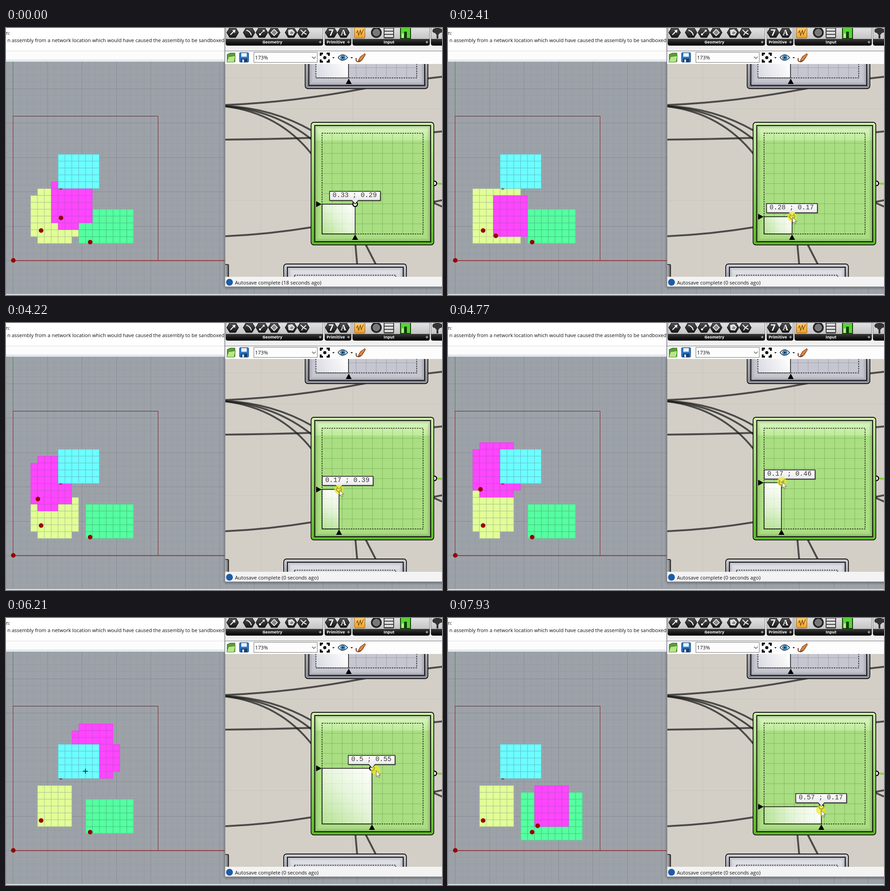
Recreate the animation shown at these times as an HTML page with a canvas. Size 956 by 586 pixels, loop 8 s.

```html
<!DOCTYPE html>
<html lang="en">
<head>
<meta charset="utf-8">
<title>Room packing</title>
<style>
html, body { margin: 0; width: 100%; height: 100%; overflow: hidden; background: #fff; }
canvas { display: block; width: 956px; height: 586px; }
</style>
</head>
<body>
<canvas id="stage" width="956" height="586"></canvas>
<script>
const W = 956, H = 586, LOOP = 8000, START = 260, STEP = 69;
const CELL = 15.07, GX = 53.9, GY = 231.9;
const UI = '11.2px "Open Sans", sans-serif';
const stage = document.getElementById('stage').getContext('2d');
const backdrop = document.createElement('canvas');
backdrop.width = W;
backdrop.height = H;
let g = backdrop.getContext('2d');

// time, slider x, slider y
const PATH = [
  [0, .33, .294], [1300, .33, .294], [1930, .33, .27], [2399, .28, .17],
  [2469, .28, .17], [2800, .21, .18], [3180, .19, .38], [3620, .2, .18],
  [4193, .17, .39], [4263, .17, .39], [4420, .155, .41], [5180, .2, .52],
  [5297, .24, .55], [5367, .262, .55], [5700, .3, .6], [6050, .385, .6],
  [6194, .497, .55], [6264, .535, .53], [6830, .57, .335], [6884, .57, .313],
  [6954, .575, .267], [7300, .595, .24], [7660, .6, .215], [7919, .57, .17],
  [7989, .565, .138]
];
const POINTER = [[330, 555, 545], [1020, 761, 420], [1290, 766, 387]];

// helpers
function at(table, t) {
  let i = 1;
  while (i < table.length - 1 && table[i][0] < t) i++;
  const p = table[i - 1], q = table[i];
  const u = Math.min(1, Math.max(0, (t - p[0]) / (q[0] - p[0])));
  return [p[1] + (q[1] - p[1]) * u, p[2] + (q[2] - p[2]) * u];
}
function box(x, y, w, h, fill) {
  g.fillStyle = fill;
  g.fillRect(x, y, w, h);
}
function outline(x, y, w, h, color, lw) {
  g.strokeStyle = color;
  g.lineWidth = lw;
  g.strokeRect(x, y, w, h);
}
function round(x, y, w, h, r, fill, stroke, lw = 1) {
  g.beginPath();
  g.roundRect(x, y, w, h, r);
  paint(fill, stroke, lw);
}
function paint(fill, stroke, lw = 1) {
  if (fill) { g.fillStyle = fill; g.fill(); }
  if (stroke) { g.strokeStyle = stroke; g.lineWidth = lw; g.stroke(); }
}
function disc(x, y, r, fill, stroke, lw) {
  g.beginPath();
  g.arc(x, y, r, 0, Math.PI * 2);
  paint(fill, stroke, lw);
}
function poly(points, fill, stroke, lw) {
  g.beginPath();
  points.forEach(([x, y]) => g.lineTo(x, y));
  g.closePath();
  paint(fill, stroke, lw);
}
function line(x1, y1, x2, y2, color, lw = 1) {
  g.beginPath();
  g.moveTo(x1, y1);
  g.lineTo(x2, y2);
  paint(null, color, lw);
}
function curve(d, color, lw) {
  g.strokeStyle = color;
  g.lineWidth = lw;
  g.stroke(new Path2D(d));
}
function text(s, x, y, font, color, align = 'left') {
  g.font = font;
  g.fillStyle = color;
  g.textAlign = align;
  g.fillText(s, x, y);
}
function fade(x1, y1, x2, y2, ...colors) {
  const f = g.createLinearGradient(x1, y1, x2, y2);
  colors.forEach((c, i) => f.addColorStop(i / (colors.length - 1), c));
  return f;
}
function dashed(x, y, w, h) {
  g.setLineDash([3, 2.2]);
  outline(x, y, w, h, '#111', 1.5);
  g.setLineDash([]);
}
function mesh(x, y, w, h, gap, color) {
  for (let i = gap; i < w - 1; i += gap) line(x + i, y, x + i, y + h, color);
  for (let i = gap; i < h - 1; i += gap) line(x, y + i, x + w, y + i, color);
}
const upMark = (x, y) => poly([[x, y], [x + 6.5, y + 12], [x - 6.5, y + 12]], '#000');

// fixed scenery
function drawViewport() {
  box(0, 0, W, H, '#fff');
  box(0, 50, 480, 1, '#dcdfe3');
  box(0, 51, 480, 18, '#fcfcfd');
  box(0, 69, 480, 5, '#e2e8ee');
  text('n:', -1, 15, UI, '#111');
  text('n assembly from a network location which would have caused the assembly to be sandboxed', 479, 31, '11px "Open Sans", sans-serif', '#111', 'right');
  box(0, 74, W, 510, '#9da2a9');
  for (let i = -1; i < 64; i++) {
    const x = Math.round(16 + i * 15.1) - .5;
    line(x, 74, x, 584, i % 5 ? '#969ca3' : '#878d95');
  }
  for (let i = -4; i < 29; i++) {
    const y = Math.round(510 - i * 15.1) + .5;
    line(0, y, 480, y, i % 5 ? '#969ca3' : '#878d95');
  }
  box(0, 584, W, 2, '#e2e8ee');
  line(15.5, 74, 15.5, 194, '#3f8a48');
  line(16, 510.5, 480, 510.5, '#931c20', 1.3);
  line(15.5, 193.5, 15.5, 510, '#931c20');
  line(333.5, 193.5, 333.5, 510, '#84262a');
  line(15.5, 193.5, 333.5, 193.5, '#54262b');
  disc(16, 510, 5, '#960000');
}

function hex(x) {
  const p = [];
  for (let i = 0; i < 6; i++) p.push([x + 13 * Math.cos(i * Math.PI / 3), 10 + 12.5 * Math.sin(i * Math.PI / 3)]);
  poly(p, fade(0, -2, 0, 22, '#555', '#111'), '#000', 1);
}
function group(x, w, label, cx) {
  round(x, -8, w, 46, 4, fade(0, 0, 0, 24, '#e2e2e2', '#c4c4c4'), '#777');
  round(x, 24, w, 14.5, [0, 0, 4, 4], fade(0, 24, 0, 38, '#3a3a3a', '#000'));
  text(label, cx, 34, 'bold 8.8px "Open Sans", sans-serif', '#fff', 'center');
  const px = x + w - 6;
  line(px - 3, 31, px + 3, 31, '#ccc', 1.3);
  line(px, 28, px, 34, '#ccc', 1.3);
}
function drawRibbon() {
  box(480, 0, 476, 51, '#f0f0f0');
  group(482, 213, 'Geometry', 584);
  group(699, 58, 'Primitive', 723);
  group(760, 169, 'Input', 840);
  group(932, 60, '', 960);
  [497, 533, 561, 588, 625, 652, 713, 740].forEach(hex);
  line(492, 15, 500, 7, '#fff', 2);
  poly([[503, 4], [502, 11], [496, 5]], '#fff');
  curve('M527 5Q536 7 538 16', '#fff', 2);
  line(557, 14, 565, 6, '#fff', 1.5);
  box(555, 12, 4, 4, '#fff');
  box(563, 4, 4, 4, '#fff');
  poly([[588, 3], [595, 10], [588, 17], [581, 10]], '#888', '#fff', 1.5);
  poly([[619, 5], [627, 3], [633, 9], [629, 16], [620, 15]], '#ddd', '#fff', 1);
  poly([[626, 7], [631, 10], [627, 14], [622, 12]], '#888');
  curve('M646 4L652 10L658 5M652 10L648 16M652 10L659 14', '#eee', 2.2);
  text('7', 713, 17, 'bold 19px "Open Sans", sans-serif', '#fff', 'center');
  text('A', 740, 16, 'bold 17px "Noto Serif", serif', '#fff', 'center');
  round(764, -3, 23, 25, 2, fade(0, 0, 0, 22, '#ffcf70', '#ee9d23'), '#8a5510');
  curve('M768 11L771 6L773 16L777 5L779 14L784 3', '#74470c', 1.3);
  disc(812, 10, 11, '#333', '#111', 1.5);
  disc(812, 10, 7, '#777', '#aaa', 1);
  round(828, -3, 23, 26, 3, '#444');
  [1, 8, 15].forEach(y => round(830, y, 19, 5, 1, '#ddd'));
  box(864, -2, 24, 26, '#173d0d');
  box(866, 0, 20, 22, '#55d633');
  box(873, 8, 6, 14, '#143a0a');
  box(868, 12, 4, 10, '#b4f68d');
  [[940, 6], [946, 2], [952, 6], [946, 10]].forEach(([x, y]) => disc(x, y, 5, '#333'));
  box(944, 10, 4, 13, '#333');
}
function drawToolbar() {
  box(480, 50, 476, 1, '#777');
  box(480, 51, 476, 28, '#fdfdfd');
  poly([[485, 58], [492, 55], [502, 55], [502, 74], [485, 74]], '#5d9c3c', '#2d5e1d', 1);
  poly([[488, 63], [503, 61], [500, 75], [484, 75]], '#b7e884', '#47842d', 1);
  round(512, 54, 20, 21, 2, '#2f78c4', '#123f76');
  box(516, 55, 12, 8, '#e9f2fb');
  box(515, 67, 14, 8, '#173f70');
  box(518, 69, 4, 6, '#ddd');
  outline(543.5, 53.5, 139, 22, '#777', 1);
  text('173%', 546, 69, UI, '#111');
  curve('M671 63L675 67L679 63', '#444', 1.1);
  curve('M690 61V56H695M703 56H708V61M708 69V74H703M695 74H690V69', '#111', 4);
  disc(699, 65, 3.5, '#111');
  [718, 758].forEach(x => poly([[x - 2.5, 64], [x + 2.5, 64], [x, 67]], '#111'));
  g.beginPath();
  g.moveTo(728, 65);
  g.quadraticCurveTo(738, 52, 749, 65);
  g.quadraticCurveTo(738, 77, 728, 65);
  paint('#e9f4fb', '#24394d', 1.6);
  disc(738.5, 65, 5, '#3f97cf', '#1c4e7c', 1);
  disc(738.5, 65, 2, '#0c1d30');
  curve('M768 66Q766 75 774 74Q781 72 787 58', '#7c2c16', 2);
  poly([[772, 72], [777, 63], [787, 56], [788, 59], [779, 72]], '#d9853c', '#5b2412', 1);
}

function node(x, y, w, h, rim, face) {
  round(x, y, w, h, 6, rim, '#111', 1.8);
  round(x + 1.7, y + 1.7, w - 3.4, h - 3.4, 5, null, 'rgba(255,255,255,.35)', 1.2);
  face();
  // soft shade along the inner edge
  for (let i = 0; i < 9; i++) {
    outline(x + 8.5 + i, y + 7.5 + i, w - 16 - 2 * i, h - 15 - 2 * i, `rgba(0,0,0,${.2 * (1 - i / 9) ** 1.4})`, 1);
  }
  outline(x + 8, y + 7, w - 15, h - 14, '#111', 2);
}
function drawSheet() {
  g.save();
  g.beginPath();
  g.rect(481, 79, 475, 467);
  g.clip();
  box(480, 79, 476, 467, '#d3cfc7');
  [558.5, 760.5].forEach(x => line(x, 79, x, 546, '#c6c1b8'));
  [109.5, 177.5, 378.5].forEach(y => line(481, y, 956, y, '#c9c4bb'));

  const wire = 'rgba(30,30,30,.74)';
  [
    'M481 169Q630 163 790 132', 'M481 171Q585 176 672 226',
    'M481 172Q590 180 672 246', 'M481 172Q600 187 672 279',
    'M481 245Q575 244 672 241', 'M481 457Q575 453 672 437',
    'M922 111L956 107', 'M936 229L956 227', 'M936 382L956 378',
    'M936 383L956 392', 'M766 474L770 519', 'M788 474L811 519'
  ].forEach(d => curve(d, wire, 4));
  line(942, 341, 956, 342, '#83d32c', 4);

  node(656, -137, 269, 270, fade(0, 79, 0, 133, '#a2a2ae', '#858592'), () => box(664, -130, 253, 256, '#c6c6d0'));
  mesh(679, -112, 222, 221, 22.15, 'rgba(80,80,95,.28)');
  box(679, 60, 72, 49, fade(679, 109, 751, 79, '#d9d9e2', '#fff'));
  dashed(679.5, -112, 221, 221.5);
  line(751, 79, 751, 110, '#111', 1.5);
  line(679, 109.5, 751, 109.5, '#111', 1.2);
  upMark(751.5, 111);

  node(609, 518, 269, 270, fade(0, 518, 0, 546, '#c9c9d2', '#a6a6b2'),
    () => box(617, 525, 253, 60, fade(0, 525, 0, 560, '#e4e4ea', '#cfcfd8')));
  dashed(632.5, 542.5, 222, 222);
  round(470, 519, 18, 60, 2, fade(481, 0, 488, 0, '#bbb', '#555'), '#111', 1.5);

  disc(939, 341, 5, '#fff', '#000', 2.5);
  node(669, 207, 269, 269, fade(0, 207, 0, 476, '#c6f09c', '#88d155', '#4cb60f'), () => {
    box(677, 214, 254, 255, '#aade82');
    box(677, 214, 254, 33, fade(0, 214, 0, 247, '#dcf7c4', '#bdea98'));
  });
  mesh(693, 231, 221, 221, 22.1, 'rgba(60,120,40,.34)');
  g.restore();
}
function drawFrame() {
  box(480, 546, 476, 22, '#f3f3f3');
  disc(490, 558, 7.5, '#1d5ca8');
  box(474, 74, 5, 495, fade(474, 0, 479, 0, 'rgba(0,0,0,0)', 'rgba(0,0,0,.15)'));
  box(479, 0, 1.5, 569, '#7b7f84');
  box(479, 567.5, 477, 1.5, '#7b7f84');
  box(480, 569, 476, 6, fade(0, 569, 0, 575, 'rgba(0,0,0,.25)', 'rgba(0,0,0,0)'));
}

// A room claims its block, then makes up for lost cells by walking rings around it.
function grow(x, y, w, h, taken) {
  const c = Math.floor((x - GX) / CELL), r = Math.floor((y - GY) / CELL);
  const cells = [], top = r - h + 1;
  for (let i = c; i < c + w; i++) for (let j = top; j <= r; j++) cells.push([i, j]);
  const busy = ([i, j]) => taken.has(i + ',' + j);
  const lost = cells.filter(busy).length;
  let extra = lost < 5 ? 2 * lost : lost + 8;
  for (let k = 1; extra > 0; k++) {
    const l = c - k, rt = c + w - 1 + k, t = top - k, b = r + k;
    const ring = [], half = l + Math.ceil((rt - l - 1) / 2);
    for (let j = b - 1; j > t; j--) ring.push([l, j]);
    for (let i = l + 1; i <= half; i++) ring.push([i, b]);
    for (let i = l + 1; i < rt; i++) ring.push([i, t]);
    for (let i = half + 1; i < rt; i++) ring.push([i, b]);
    for (let j = b - 1; j > t; j--) ring.push([rt, j]);
    ring.push([l, t], [l, b], [rt, t], [rt, b]);
    cells.push(...ring.slice(0, extra));
    extra -= ring.length;
  }
  const own = cells.filter(p => !busy(p));
  own.forEach(([i, j]) => taken.add(i + ',' + j));
  return own;
}
function tiles(cells, fill, edge) {
  for (const [i, j] of cells) {
    const x = GX + i * CELL, y = GY + j * CELL;
    box(x, y, CELL, CELL, edge);
    box(x + .6, y + .6, CELL - 1.2, CELL - 1.2, fill);
  }
}
function drawRooms(a, b) {
  const x = 16 + 317 * a, y = 510 - 317 * b, taken = new Set();
  const cyan = grow(120, 351, 6, 5, taken);
  const pink = grow(x, y, 5, 6, taken);
  const lime = grow(77, 444, 5, 6, taken);
  const mint = grow(184.5, 470, 7, 5, taken);
  tiles(lime, '#e1ff96', '#bccb96');
  tiles(mint, '#55ffa0', '#42cd85');
  tiles(pink, '#ff46ff', '#d63fdc');
  [[77, 444.5], [184.5, 470], [120, 349.5], [x, y]].forEach(p => disc(p[0], p[1], 5, '#960000'));
  tiles(cyan, '#6cffff', '#5accdb');
  if (x > 119 && x < 199 && y > 282 && y < 347) {
    line(x - 5, y + .5, x + 6, y + .5, '#111', 1.3);
    line(x + .5, y - 5, x + .5, y + 6, '#111', 1.3);
  }
}

const knob = ([a, b]) => [692.6 + 221 * a, 452 - 222 * b];
const short = v => String(Math.round(v * 100) / 100);

function drawSlider(a, b) {
  const [x, y] = knob([a, b]);
  box(693, y, x - 693, 452 - y, fade(693, 452, x, y, '#b5e293', '#e4f4d8', '#fff'));
  g.save();
  g.beginPath();
  g.rect(693, y, x - 693, 452 - y);
  g.clip();
  mesh(693, 231, 221, 221, 22.1, 'rgba(60,120,40,.09)');
  g.restore();
  dashed(693, 231, 221.5, 221);
  outline(693, y, x - 693, 452 - y, '#111', 1.5);
  poly([[692, y], [680, y - 6.5], [680, y + 6.5]], '#000');
  upMark(x, 453);
  disc(x, y, 5, '#fff', '#000', 2.5);

  const label = short(a) + ' ; ' + short(b);
  const w = label.length * 8.85 + 14;
  const lx = Math.round(Math.max(692.6, x - w / 2 - .8)) + .5, ly = Math.round(y - 29) + .5;
  box(lx + 2, ly + 2, w, 20, 'rgba(0,0,0,.25)');
  poly([
    [lx, ly], [lx + w, ly], [lx + w, ly + 20], [x + 7, ly + 20],
    [x, ly + 28], [x - 7, ly + 20], [lx, ly + 20]
  ], fade(0, ly, 0, ly + 20, '#fff', '#e9e9e9'), '#111', 1.4);
  text(label, lx + 6.5, ly + 12.5, '14.7px "Liberation Mono", monospace', '#333');
}

function drawPointer(t) {
  if (t < POINTER[0][0]) return;
  const [x, y] = t < 1290 ? at(POINTER, t) : knob(at(PATH, t + 70));
  disc(x, y, 10.5, 'rgba(236,232,40,.72)');
  g.save();
  g.translate(x + 1, y + 1);
  poly([[0, 0], [0, 13], [3, 10.3], [5.2, 15], [7.4, 14], [5.2, 9.4], [9.2, 9.2]], '#fff', '#554f20', .9);
  g.restore();
}

function render(t) {
  const now = t < START ? 0 : START + Math.floor((t - START) / STEP) * STEP;
  const [a, b] = at(PATH, now);
  g.drawImage(backdrop, 0, 0);
  drawRooms(a, b);
  drawSlider(a, b);
  const age = now < 600 ? 18 : now < 1300 ? 19 : 0;
  text('Autosave complete (' + age + ' seconds ago)', 502, 562.5, UI, '#111');
  drawPointer(now);
}

drawViewport();
drawRibbon();
drawToolbar();
drawSheet();
drawFrame();
g = stage;
const begin = performance.now();
function tick() {
  render((performance.now() - begin) % LOOP);
  requestAnimationFrame(tick);
}
tick();
</script>
</body>
</html>
```
